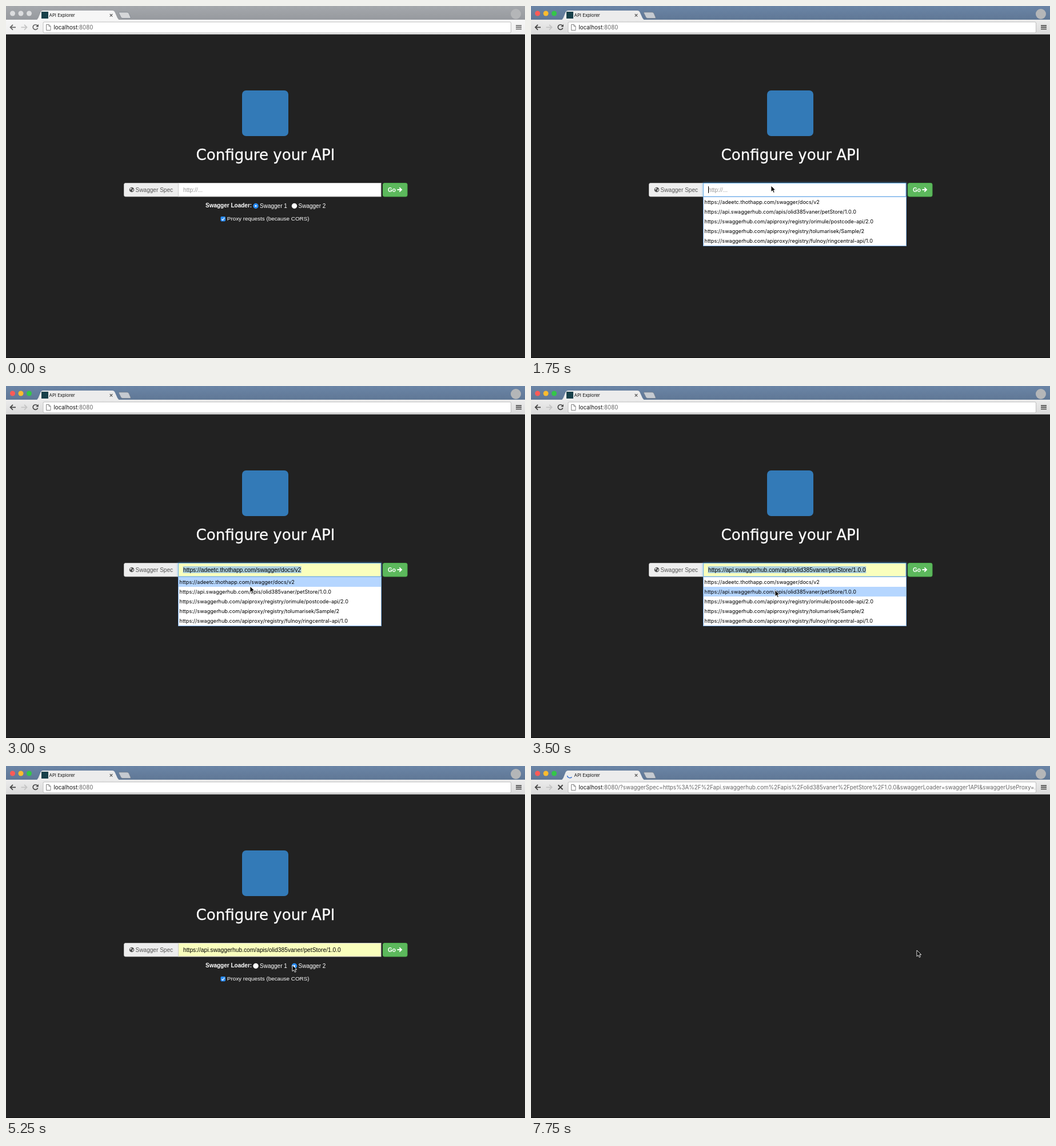
An HTML page for the animation above (8000 ms loop, 908 px wide and 617 px high).

```html
<!DOCTYPE html>
<html lang="en">
<head>
<meta charset="utf-8">
<title>API Explorer</title>
<style>
  html, body { margin: 0; width: 100%; height: 100%; overflow: hidden; background: #222; }
  svg { display: block; width: 100vw; height: 100vh; }
  text { white-space: pre; }
  .ui { font-family: Inter, Roboto, sans-serif; }
  .page { font: 10.1px "Liberation Sans", Arial, sans-serif; fill: #fff; }
  .title { font: 26.1px "DejaVu Sans", Verdana, sans-serif; stroke: #fff; stroke-width: .3; }
  .row { font-size: 9.1px; font-kerning: none; fill: #000; }
  .bold { font-weight: bold; }
  .field { font-size: 10.25px; }
  .line { fill: none; stroke: #555; stroke-width: 1.7; }
  .focused { stroke: #66afe9; filter: drop-shadow(0 0 2px rgba(102, 175, 233, .6)); }
</style>
</head>
<body>
<svg viewBox="0 0 908 617">
  <defs>
    <linearGradient id="titleIdle" x2="0" y2="1">
      <stop stop-color="#a5a8ac"/><stop offset="1" stop-color="#96999e"/>
    </linearGradient>
    <linearGradient id="titleActive" x2="0" y2="1">
      <stop stop-color="#6b85a6"/><stop offset="1" stop-color="#5f7795"/>
    </linearGradient>
    <linearGradient id="barIdle" x2="0" y2="1">
      <stop stop-color="#f6f6f6"/><stop offset="1" stop-color="#efefef"/>
    </linearGradient>
    <linearGradient id="barActive" x2="0" y2="1">
      <stop stop-color="#ececec"/><stop offset="1" stop-color="#dadada"/>
    </linearGradient>
    <clipPath id="addressClip"><rect x="66" y="28" width="816" height="19"/></clipPath>
  </defs>

  <rect width="908" height="617" fill="#222"/>
  <rect y="616" width="908" height="1" fill="#111"/>

  <!-- Browser window -->
  <rect id="titleBar" width="908" height="25"/>
  <rect id="toolbar" y="24" width="908" height="26"/>
  <rect y="49" width="908" height="1" fill="#b4b4b4"/>
  <g id="lights">
    <circle cx="11.5" cy="13" r="4.5"/><circle cx="26" cy="13" r="4.5"/><circle cx="40.5" cy="13" r="4.5"/>
  </g>
  <path id="tab" d="M52 25Q55 24 56.500 21L60.500 11Q62 8 65 8H186Q189 8 190.500 11L195 21Q196.500 24 200 25Z"/>
  <path id="newTab" d="M198.500 11H212Q214 11 215 13L218 20Q218.500 21.500 217 21.500H204Q202 21.500 201 19.500L197.500 12.500Q197 11 198.500 11Z" stroke="#777f89" stroke-width=".7"/>
  <rect id="favicon" x="62" y="10" width="12" height="12" fill="#17404a"/>
  <path id="spinner" d="M-4.700 1A4.800 4.800 0 0 0 3.400 3.400" fill="none" stroke="#3d74d0" stroke-width="1.500"/>
  <text class="ui" x="75.500" y="19" font-size="7.800" fill="#111">API Explorer</text>
  <path d="M181.700 14L186.300 18.600M186.300 14L181.700 18.600" class="line" style="stroke-width:1.100"/>
  <circle cx="892" cy="14" r="9" fill="#b4b6b8"/>

  <path class="line nav" d="M17 37.300H7.800M12 32.800L7.500 37.300L12 41.800"/>
  <path class="line" style="stroke:#c4c4c4" d="M26.500 37.300H36M32 32.800L36.500 37.300L32 41.800"/>
  <g id="reload">
    <path class="line nav" d="M54.800 34.300A4.300 4.300 0 1 0 55.600 38.400"/>
    <path d="M56.800 32V36.600H52.200Z" fill="#444"/>
  </g>
  <path id="stop" class="line nav" style="stroke-width:2" d="M47.500 33.300L55.500 41.300M55.500 33.300L47.500 41.300"/>
  <rect x="65" y="28" width="818.500" height="19" rx="2" fill="#fff" stroke="#b8b8b8" stroke-width=".9"/>
  <path d="M70.500 32.500H75L78 35.500V42.500H70.500ZM75 32.500V35.500H78" fill="#fff" stroke="#777" stroke-width=".9"/>
  <text class="ui" x="83.500" y="41" font-size="9.750" fill="#666" clip-path="url(#addressClip)"><tspan fill="#111">localhost</tspan><tspan id="address"></tspan></text>
  <path class="line nav" d="M892 34.300H902M892 37.400H902M892 40.500H902"/>

  <!-- Configuration form -->
  <g id="form" class="page">
    <rect x="413" y="148" width="81" height="80" rx="7" fill="#337ab7"/>
    <text x="332.500" y="270" class="title">Configure your API</text>

    <path d="M301.500 310.500H209Q206.500 310.500 206.500 313V331.500Q206.500 334 209 334H301.500Z" fill="#eee" stroke="#ccc" stroke-width=".8"/>
    <circle cx="220" cy="322" r="4.300" fill="#555"/>
    <path d="M217 319.500L220 319L219 321.500L217.500 322ZM221 322L223.500 321L222.500 324L221 325Z" fill="#eee"/>
    <text x="226.500" y="325.500" fill="#555">Swagger Spec</text>
    <rect id="input" x="301.500" y="310.500" width="354.500" height="23.500" stroke="#ccc"/>
    <rect id="selection" x="309.500" y="316" height="12" fill="#acd0dd"/>
    <text id="value" class="field" x="310" y="325.500"></text>
    <rect id="caret" y="316" width="1" height="12" fill="#000"/>

    <rect id="go" x="659.500" y="310.500" width="42.500" height="23.500" rx="2.500"/>
    <text x="668" y="325.500" class="bold">Go</text>
    <path d="M684.500 322H691.500M688.300 318.300L692 322L688.300 325.700" fill="none" stroke="#fff" stroke-width="1.900"/>

    <text x="349" y="353" class="bold" font-size="10">Swagger Loader:</text>
    <g id="radio1"><circle cx="437" cy="350.500" r="4.700"/><circle cx="437" cy="350.500" r="1.400" fill="#fff"/></g>
    <text x="444" y="353.500" font-size="10">Swagger 1</text>
    <g id="radio2"><circle cx="504.500" cy="350.500" r="4.700"/><circle cx="504.500" cy="350.500" r="1.400" fill="#fff"/></g>
    <text x="511.500" y="353.500" font-size="10">Swagger 2</text>
    <rect x="375.500" y="369" width="8.500" height="8.500" rx="1.700" fill="#2a8cf5"/>
    <path d="M377.500 373.500L379.300 375.500L382.200 371" fill="none" stroke="#fff" stroke-width="1.200"/>
    <text x="386.800" y="376.300" style="font-size:9.900px">Proxy requests (because CORS)</text>

    <g id="menu">
      <rect x="301.500" y="334.500" width="355" height="86" fill="#fff" stroke="#7fb2ea"/>
      <rect id="highlight" x="302" width="354" height="17" fill="#b5d6ff"/>
    </g>
  </g>

  <path id="cursor" d="M0 0V10.800L2.500 8.500L4.300 12.400L6.200 11.600L4.500 7.800H7.800Z" fill="#000" stroke="#fff" stroke-width=".9"/>
</svg>

<script>
  const LOOP = 8000, STEP = 250;
  const MENU_OPEN = 1750, PICK = 3750, BLUR = 5000, LOADER_SET = 5250, PRESS = 7250, BLANK = 7500;
  const el = id => document.getElementById(id);
  const show = (id, on) => el(id).style.display = on ? '' : 'none';
  const fill = (id, color) => el(id).setAttribute('fill', color);
  const within = (t, from, to) => t >= from && t < to;

  const specs = [
    'https://adeetc.thothapp.com/swagger/docs/v2',
    'https://api.swaggerhub.com/apis/olid385vaner/petStore/1.0.0',
    'https://swaggerhub.com/apiproxy/registry/orimule/postcode-api/2.0',
    'https://swaggerhub.com/apiproxy/registry/tolumarisek/Sample/2',
    'https://swaggerhub.com/apiproxy/registry/fulnoy/ringcentral-api/1.0'
  ];
  const query = `/?swaggerSpec=${encodeURIComponent(specs[1])}` +
    '&swaggerLoader=swagger1API&swaggerUseProxy=...';

  specs.forEach((spec, i) => {
    const row = document.createElementNS('http://www.w3.org/2000/svg', 'text');
    row.setAttribute('class', 'ui row');
    row.setAttribute('x', 303.5);
    row.setAttribute('y', 347.3 + 17 * i);
    row.textContent = spec;
    el('menu').append(row);
  });

  // Cursor stops: time, x, y; each move between them eases in and out
  const path = [
    [250, 442, 177], [1000, 408, 335], [1250, 420, 315], [2750, 420, 315],
    [3000, 427, 351], [3500, 427, 358], [4000, 427, 358], [5000, 500, 348],
    [5250, 501, 349], [5750, 540, 379], [6500, 675, 324], [6750, 675, 323], [LOOP, 675, 323]
  ];

  function cursorAt(t) {
    const i = Math.max(1, path.findIndex(p => p[0] > t));
    const [t0, x0, y0] = path[i - 1], [t1, x1, y1] = path[i];
    const k = Math.max(0, (t - t0) / (t1 - t0));
    const eased = k * k * (3 - 2 * k);
    return [x0 + (x1 - x0) * eased, y0 + (y1 - y0) * eased];
  }

  function drawWindow(t) {
    const active = t >= 1500, loading = t >= PRESS;
    fill('titleBar', active ? 'url(#titleActive)' : 'url(#titleIdle)');
    fill('toolbar', active ? 'url(#barActive)' : 'url(#barIdle)');
    fill('tab', active ? '#ececec' : '#f6f6f6');
    fill('newTab', active ? '#c5cad1' : '#d6d7d9');
    const colors = active ? ['#fc5b57', '#fdbc2e', '#33c748'] : Array(3).fill('#dcdddf');
    [...el('lights').children].forEach((light, i) => light.setAttribute('fill', colors[i]));
    document.querySelectorAll('.nav').forEach(icon => icon.style.stroke = active ? '#444' : '#666');
    show('favicon', !loading);
    show('spinner', loading);
    show('reload', !loading);
    show('stop', loading);
    el('spinner').setAttribute('transform', `translate(68 16) rotate(${(t - 7750) * 0.36})`);
    el('address').textContent = ':8080' + (t >= BLANK ? query : '');
  }

  // The caret blinks twice a second from the moment it appears
  const caretOn = t => (within(t, 1500, 3000) && (t - 1500) % 1000 < 500) ||
    (within(t, PICK, BLUR) && (t - PICK) % 1000 < 500);

  function drawForm(t, [x, y]) {
    const filled = t >= 3000, previewing = within(t, 3000, PICK);
    const row = y < 352 ? 0 : 1;
    const value = el('value');
    value.textContent = !filled ? 'http://...' : specs[previewing ? row : 1];
    value.style.fill = filled ? '#000' : '#999';
    const width = value.getComputedTextLength();

    fill('input', filled ? '#faffbd' : '#fff');
    el('input').classList.toggle('focused', within(t, 1500, BLUR));
    show('selection', previewing);
    el('selection').setAttribute('width', width + 1);
    show('caret', caretOn(t));
    el('caret').setAttribute('x', 310 + (filled ? width : 0));

    show('menu', within(t, MENU_OPEN, PICK));
    show('highlight', previewing);
    el('highlight').setAttribute('y', 335 + 17 * row);

    const second = t >= LOADER_SET;
    fill('radio1', second ? '#fff' : '#2a8cf5');
    fill('radio2', second ? '#2a8cf5' : '#fff');

    const hover = x >= 659 && y < 334;
    fill('go', t >= PRESS ? '#398439' : hover ? '#449d44' : '#5cb85c');
    el('go').setAttribute('stroke', hover ? '#398439' : '#4cae4c');
  }

  function frame() {
    const t = Math.floor(performance.now() % LOOP / STEP) * STEP;
    const pointer = cursorAt(t);
    drawWindow(t);
    show('form', t < BLANK);
    if (t < BLANK) drawForm(t, pointer);
    show('cursor', t >= 250);
    el('cursor').setAttribute('transform', `translate(${pointer})`);
    requestAnimationFrame(frame);
  }
  frame();
</script>
</body>
</html>
```
